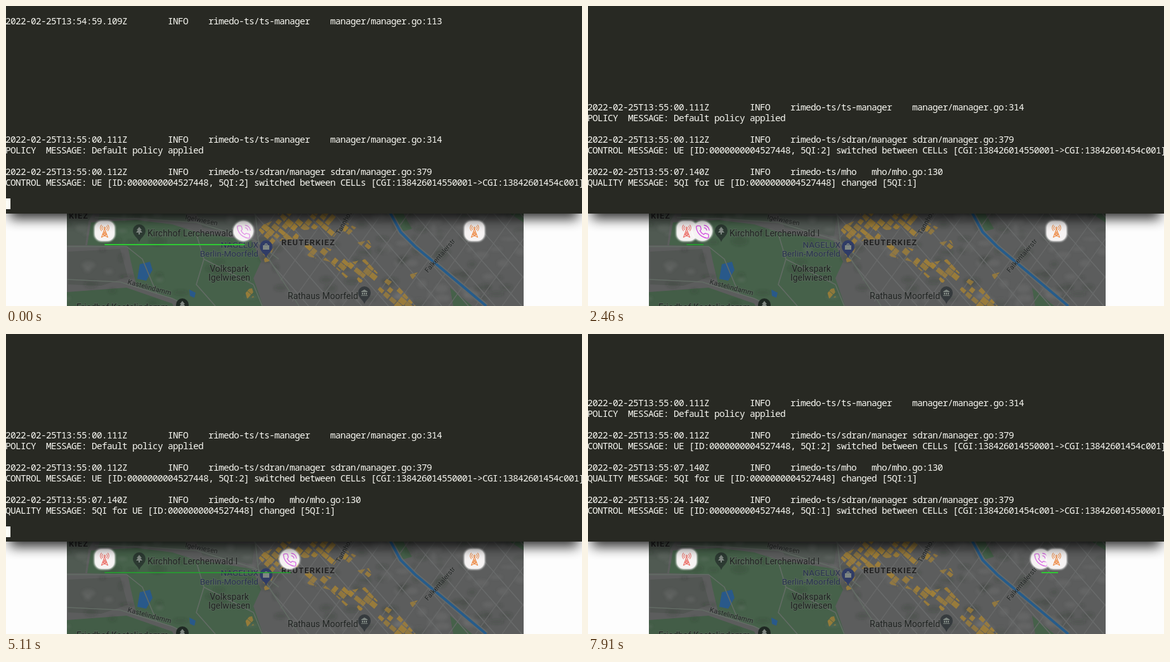
Recreate the animation shown at these times as an HTML page. Size 908 by 474 pixels, loop 8 s.

```html
<!DOCTYPE html>
<html lang="en">
<head>
<meta charset="utf-8">
<title>Traffic steering log and map</title>
<style>
html, body { margin: 0; width: 100%; height: 100%; overflow: hidden; background: #fdfdfd; }
svg { display: block; width: 908px; height: 474px; }
#log text { font: 14.5px "Noto Sans Mono", monospace; letter-spacing: -.7px; fill: #f8f8f2; white-space: pre; }
#labels text { font-family: Roboto, sans-serif; font-size: 14px; fill: #202422;
  paint-order: stroke; stroke: #777; stroke-opacity: .28; stroke-width: 2px; }
#labels .street { font-size: 11px; fill: #242827; }
#labels .area { font-weight: 700; font-size: 13px; letter-spacing: 1px; fill: #222; }
#labels .shop { fill: #2a3450; font-size: 13.5px; text-anchor: end; }
#labels .mid { text-anchor: middle; }
</style>
</head>
<body>
<svg viewBox="0 0 908 474">
  <defs>
    <clipPath id="mapBox"><rect x="96" y="320" width="720" height="154"/></clipPath>
    <clipPath id="city"><path d="M388 320H816V474H455L420 410L398 380Z"/></clipPath>
    <clipPath id="shopArea">
      <path d="M395 350L428 336L466 350L460 368L426 372L418 392L404 388L412 370Z"/>
      <path d="M428 328H520L528 350L516 366L496 352L470 354L440 342Z"/>
      <path d="M458 380L484 374L522 388L552 418L536 430L510 404L478 396Z"/>
      <path d="M538 406L566 400L588 424L616 440L646 474H612L586 448L556 436Z"/>
      <path d="M552 374L572 370L578 382L560 388ZM536 342L552 350L540 362L530 356ZM404 392L418 390L420 402L408 405ZM376 448L388 446L392 460L380 462ZM795 440L816 434V452L802 456ZM636 424L652 420L660 432L644 438Z"/>
    </clipPath>
    <filter id="drop" x="-10%" y="-10%" width="120%" height="130%"><feGaussianBlur stdDeviation="9.5"/></filter>
    <filter id="glow" x="-40%" y="-40%" width="180%" height="180%"><feGaussianBlur stdDeviation="1.8"/></filter>
    <filter id="soft"><feGaussianBlur stdDeviation="2"/></filter>
    <g id="tower" fill="none" stroke-width="1.1" stroke-linecap="round">
      <path d="M0-3.5L-5 10M0-3.5L5 10M-1.8 1.5H1.8M-3.3 5.5H3.3M-1.8 1.5L3.3 5.5L-5 10M1.8 1.5L-3.3 5.5L5 10"/>
      <circle cy="-4.8" r="1.3"/>
      <path d="M-3-7.7a4 4 0 0 0 0 5.8M3-7.7a4 4 0 0 1 0 5.8M-5-9.3a6.6 6.6 0 0 0 0 9M5-9.3a6.6 6.6 0 0 1 0 9"/>
    </g>
  </defs>

  <rect width="908" height="474" fill="#fdfdfd"/>
  <g clip-path="url(#mapBox)">
    <rect x="96" y="320" width="720" height="154" fill="#5c5d5d"/>
    <g id="parks" fill="#46614a">
      <path d="M96 320H142L130 340L125 378H96Z" fill="#505a52"/>
      <path d="M134 342L205 338L262 345L300 357L388 371L402 404L390 430L405 474H285L262 462L206 443L196 400L192 380L128 378Z"/>
      <path d="M150 320H278L290 342L206 334L145 338Z" fill="#4f5d51"/>
      <path d="M96 452L190 445L262 470L264 474H96Z" fill="#435d47"/>
      <path d="M98 388L180 384L192 428L150 442L98 440Z" fill="#525653"/>
      <path d="M300 328L392 332L388 364L310 350Z" fill="#535a55"/>
      <path d="M592 320L622 320L640 352L626 356ZM700 445L735 474H705ZM782 320H816V342Z"/>
    </g>
    <g id="relief" filter="url(#soft)"></g>
    <path d="M207 431L211 408L227 404L231 417L221 434ZM289 448L299 453L297 461L290 458Z" fill="#29598a"/>
    <g id="roads" fill="none"></g>
    <g id="shops" clip-path="url(#shopArea)"></g>
    <g fill="none">
      <path d="M602 320L622 357L645 380L700 426L757 474" stroke="#656968" stroke-width="8"/>
      <path d="M602 320L622 357L645 380L700 426L757 474" stroke="#265c8b" stroke-width="4"/>
    </g>
    <g id="pins"></g>
    <g id="labels">
      <text class="area" x="99" y="336">KIEZ</text>
      <text class="street" transform="translate(282 337) rotate(11)">Igelwiesen</text>
      <text x="223" y="364">Kirchhof Lerchenwald I</text>
      <text class="shop" x="398" y="382">NAGELUX</text>
      <text class="shop" x="398" y="396">Berlin-Moorfeld</text>
      <text class="mid" x="352" y="420">Volkspark</text>
      <text class="mid" x="352" y="434">Igelwiesen</text>
      <text class="area" x="434" y="378">REUTERKIEZ</text>
      <text x="444" y="463">Rathaus Moorfeld</text>
      <text class="street" transform="translate(191 439) rotate(15)">Kastelindamm</text>
      <text class="street" transform="translate(665 422) rotate(-49)">Falkentalerstr</text>
      <text class="street" transform="translate(526 362) rotate(-61)">Tannhofs</text>
      <text x="111" y="481">Friedhof Kastelindamm</text>
    </g>
  </g>

  <line id="link" y1="377" y2="377"/>
  <g id="left"></g>
  <g id="phone"></g>
  <g id="right"></g>

  <rect x="6" y="-40" width="896" height="376" fill="#000" opacity=".82" filter="url(#drop)"/>
  <rect width="908" height="328" fill="#282923"/>
  <g id="log"></g>
  <rect id="cursor" y="304" width="7" height="17" fill="#fcfcf6"/>
</svg>
<script>
const LOOP = 8000, STEP = 250, BLINK = 150, ROW = 17;
const CHANGE = 1110, SWITCH = 5360;      // times at which log entries arrive
const LEFT = 156, RIGHT = 738, PITCH = (RIGHT - LEFT) / 24;
const $ = id => document.getElementById(id);

function add(parent, tag, attrs, text) {
  const node = document.createElementNS('http://www.w3.org/2000/svg', tag);
  for (const k in attrs) node.setAttribute(k, attrs[k]);
  if (text) node.textContent = text;
  parent.appendChild(node);
  return node;
}

let seed = 7;
function rnd(a, b) {
  seed = (seed * 16807) % 2147483647;
  return a + (b - a) * seed / 2147483647;
}

// Building blocks lie along the street directions and leave gaps between them.
function drawShops() {
  const g = add($('shops'), 'g', { transform: 'translate(380 320) rotate(40)', fill: '#a07f38' });
  for (let x = 0; x < 360; x += 12) {
    for (let y = -270; y < 110; y += 10) {
      if (rnd(0, 1) > .72) continue;
      add(g, 'rect', { x, y, width: rnd(7, 12), height: rnd(6, 10), opacity: rnd(.7, 1) });
    }
  }
}

function drawMap() {
  for (let i = 0; i < 150; i++) {
    add($('relief'), 'ellipse', {
      cx: rnd(96, 816), cy: rnd(325, 474), rx: rnd(3, 13), ry: rnd(2, 7),
      fill: i % 2 ? '#2c302d' : '#858985', opacity: .2
    });
  }
  const roads = $('roads');
  const grid = add(roads, 'g', { 'clip-path': 'url(#city)', stroke: '#696b6b', 'stroke-width': 1.6 });
  for (let i = 0; i < 14; i++) {
    const x = 300 + i * 42;
    add(grid, 'path', { d: `M${x} 320L${x + 135} 474` });
    add(grid, 'path', { d: `M${x + 130} 320L${x + 20} 474`, opacity: .8 });
  }
  const main = [
    'M96 432L180 436L262 462L300 480', 'M140 334L210 336L300 342L392 370L430 400',
    'M96 380H190L215 400L238 455', 'M392 320L398 372L422 412L462 474',
    'M300 360L312 400L300 440L330 474', 'M312 400L390 440L404 474'
  ];
  for (const d of main) add(roads, 'path', { d, stroke: '#636c65', 'stroke-width': 1.6 });
  drawShops();
}

function drawPin(x, y, color, glyph) {
  const g = add($('pins'), 'g', { transform: `translate(${x} ${y})` });
  add(g, 'path', { d: 'M0 18C-2 11-10 8-10 0A10 10 0 0 1 10 0C10 8 2 11 0 18Z', fill: color });
  add(g, 'path', { d: glyph, fill: '#7f8782' });
}

function drawMarker(g, shape) {
  const [tag, box] = shape === 'disc'
    ? ['circle', { r: 16 }]
    : ['rect', { x: -16, y: -16, width: 32, height: 32, rx: 11 }];
  add(g, tag, { ...box, fill: '#fff', stroke: '#fff', filter: 'url(#glow)' });
  add(g, tag, { ...box, fill: '#f6f3f3', transform: 'scale(.95)' });
}

function drawTower(id, x) {
  $(id).setAttribute('transform', `translate(${x} 355.5)`);
  drawMarker($(id), 'square');
  return add($(id), 'use', { href: '#tower', stroke: '#ee9252' });
}

drawMap();
const tree = 'M0-6L4-1H2L5 3H1V6H-1V3H-5L-2-1H-4Z';
drawPin(210, 355, '#2c3a32', tree);
drawPin(278, 472, '#1f2823', tree);
drawPin(410, 380, '#303c66', 'M-5-2H-2.500A2.500 3 0 0 1 2.500-2H5V5H-5ZM-1-2H1A1 1.500 0 0 0-1-2Z');
drawPin(565, 453, '#363b3e', 'M0-5L5-2V-1H-5V-2ZM-4 0H-2V3H-4ZM-1 0H1V3H-1ZM2 0H4V3H2ZM-5 4H5V5H-5Z');
const leftIcon = drawTower('left', 155.5);
drawTower('right', 738.5);

drawMarker($('phone'), 'disc');
const phoneIcon = add($('phone'), 'path', {
  d: 'M15 5A5 5 0 0 1 19 9M15 1A9 9 0 0 1 23 9M22 17v3a2 2 0 0 1-2.200 2A20 20 0 0 1 11.200 19 19.500 19.500 0 0 1 5 13 20 20 0 0 1 2 4.200 2 2 0 0 1 4 2h3a2 2 0 0 1 2 1.700Q9.200 5.200 9.700 6.500A2 2 0 0 1 9.300 8.600L8 10a16 16 0 0 0 6 6l1.300-1.300a2 2 0 0 1 2.100-.4Q18.700 14.800 20.300 15a2 2 0 0 1 1.700 2Z',
  transform: 'translate(-11.500 -10) scale(.97)', fill: 'none', stroke: '#cf38de',
  'stroke-width': 1.4, 'stroke-linejoin': 'round', 'stroke-linecap': 'round'
});

// Columns follow eight-character tab stops.
const tabs = (...cells) => cells.reduce((s, c) => s.padEnd((s.length >> 3) * 8 + 8) + c);
const head = (time, app, file) => tabs(`2022-02-25T13:${time}Z`, 'INFO', `rimedo-ts/${app}`, file);
const moved = (qi, from, to) =>
  `CONTROL MESSAGE: UE [ID:0000000004527448, 5QI:${qi}] switched between CELLs [CGI:${from}->CGI:${to}]`;
const cellA = '138426014550001', cellB = '13842601454c001';
const lines = [
  [-21, 0, head('54:59.109', 'ts-manager', 'manager/manager.go:113')],
  [-10, 0, head('55:00.111', 'ts-manager', 'manager/manager.go:314')],
  [-9, 0, 'POLICY  MESSAGE: Default policy applied'],
  [-7, 0, head('55:00.112', 'sdran/manager', 'sdran/manager.go:379')],
  [-6, 0, moved(2, cellA, cellB)],
  [-4, CHANGE, head('55:07.140', 'mho', 'mho/mho.go:130')],
  [-3, CHANGE, 'QUALITY MESSAGE: 5QI for UE [ID:0000000004527448] changed [5QI:1]'],
  [-1, SWITCH, head('55:24.140', 'sdran/manager', 'sdran/manager.go:379')],
  [0, SWITCH, moved(1, cellB, cellA)]
].map(([row, from, text]) => ({
  from, node: add($('log'), 'text', { x: -1, y: 284 + row * ROW }, text)
}));

// The cursor blinks for a while after new output, then stays on.
function cursorOn(t) {
  if (t < CHANGE) return t < 50 || t >= 200;
  const age = t - (t < SWITCH ? CHANGE : SWITCH);
  return age >= 18 * BLINK || Math.floor(age / BLINK) % 2 === 0;
}

const tint = [[0, .5], [4, 1], [10, .9], [16, .95], [21, .72], [27, .85], [32, .72]];
function strength(step) {
  const i = Math.max(1, tint.findIndex(p => p[0] >= step));
  const [a, u] = tint[i - 1], [b, v] = tint[i];
  return u + (v - u) * (step - a) / (b - a);
}

function draw(t) {
  const step = Math.floor((t + 140) / STEP);
  const x = LEFT + Math.abs(step - 9) * PITCH;
  const switched = t >= SWITCH;
  const quality = t >= CHANGE && !switched;

  $('phone').setAttribute('transform', `translate(${x} 355.5)`);
  phoneIcon.setAttribute('opacity', strength(step));
  leftIcon.setAttribute('stroke', t >= CHANGE ? '#ec7770' : '#ee9252');

  const link = $('link');
  link.setAttribute('x1', switched ? x + 1 : 155.5);
  link.setAttribute('x2', switched ? 741 : x + 2);
  link.setAttribute('stroke', quality ? '#22a82c' : '#2fc934');
  link.setAttribute('stroke-width', quality ? 1.6 : 2);

  const rows = switched ? 0 : t >= CHANGE ? 3 : 6;
  $('log').setAttribute('transform', `translate(0 ${rows * ROW})`);
  for (const l of lines) l.node.setAttribute('visibility', t >= l.from ? 'visible' : 'hidden');
  $('cursor').setAttribute('visibility', cursorOn(t) ? 'visible' : 'hidden');
}

const start = performance.now();
function tick() {
  draw((performance.now() - start) % LOOP);
  requestAnimationFrame(tick);
}
draw(0);
requestAnimationFrame(tick);
</script>
</body>
</html>
```
